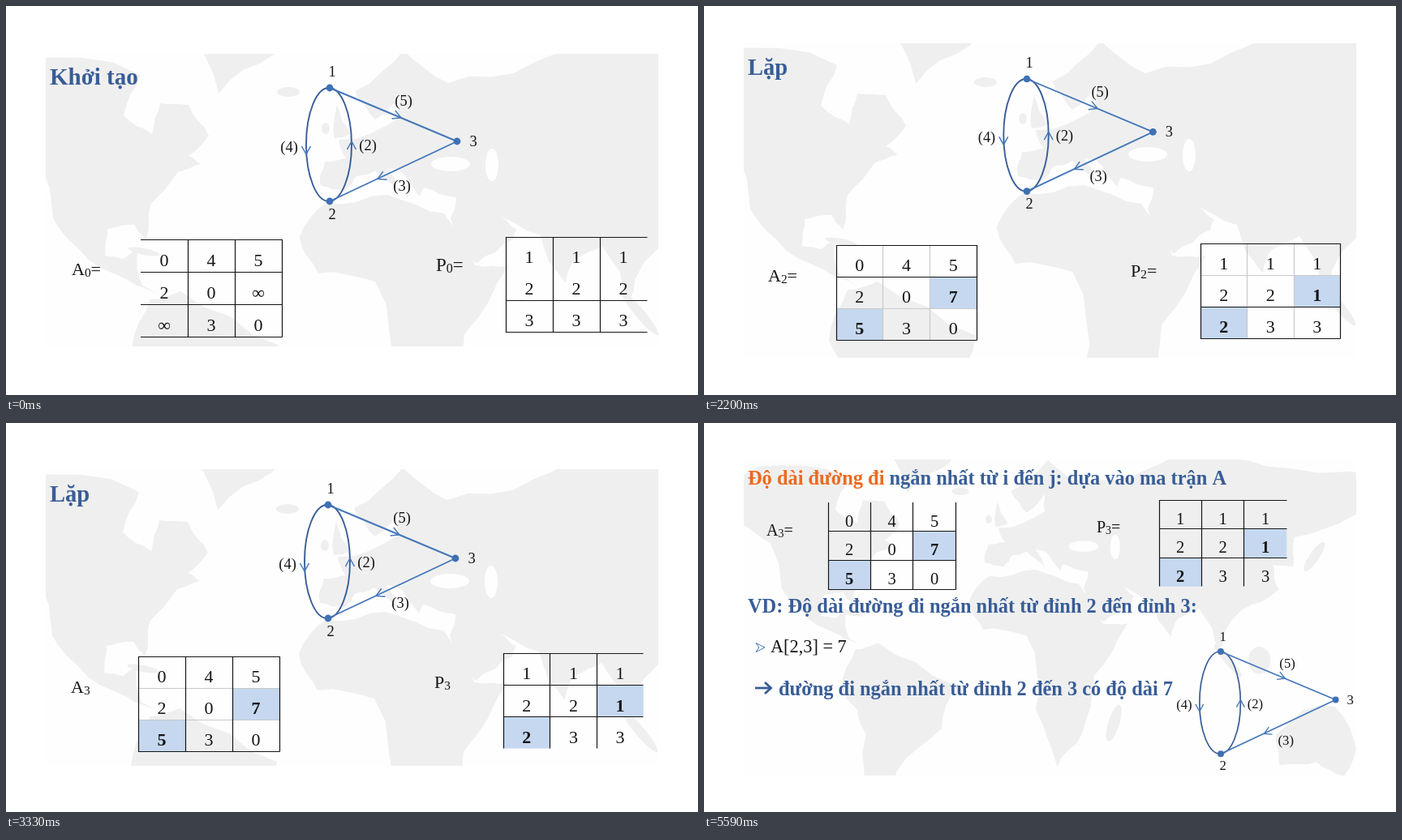
Animation, 853 px wide and 480 px high, one loop 6720 ms. Source, as an HTML page with a canvas:

```html
<!DOCTYPE html>
<html lang="vi">
<head>
<meta charset="utf-8">
<title>Đường đi ngắn nhất</title>
<style>
html, body { margin: 0; width: 100%; height: 100%; overflow: hidden; background: #fff; }
canvas { display: block; }
</style>
</head>
<body>
<canvas id="stage" width="853" height="480"></canvas>
<script>
const ctx = document.getElementById('stage').getContext('2d');
const SERIF = '"Liberation Serif", serif';
const BLUE = '#385d97', EDGE = '#4577b9', ORANGE = '#ec6a1e', INK = '#151515';
const PAPER = '#fefefe', LAND = '#efefef', MARK = '#c5d8f0', PALE = '#c9c9c9';

let seed = 7;
const random = () => (seed = (seed * 16807) % 2147483647) / 2147483647;

// Splits every side of the outline and pushes its middle sideways
function roughen(points) {
  return points.flatMap(([x, y], i) => {
    const [nx, ny] = points[(i + 1) % points.length];
    const push = (random() - 0.5) * 0.18;
    return [[x, y], [(x + nx) / 2 + (ny - y) * push, (y + ny) / 2 - (nx - x) * push]];
  });
}

function coast(corners) {
  const points = corners.split(' ').map(pair => pair.split(',').map(Number));
  return new Path2D('M' + roughen(roughen(points)).join(' ') + 'Z');
}

function blob(x, y, rx, ry, turn = 0) {
  const path = new Path2D();
  path.ellipse(x, y, rx, ry, turn, 0, 2 * Math.PI);
  return path;
}

const northAmerica = coast('-60,100 20,65 165,85 145,135 180,158 190,120 225,122 250,160 225,185 240,195 212,205 178,245 172,288 158,270 125,275 122,308 145,312 162,300 168,345 190,358 150,338 90,300 58,262 40,190 -30,140');
const southAmerica = coast('178,362 215,352 335,418 318,490 245,560 228,630 205,620 195,500 155,425');
const eurasia = coast('393,192 388,222 418,228 432,210 455,203 487,232 470,200 485,203 510,235 515,224 555,236 548,262 580,318 625,288 630,276 600,256 658,282 690,342 702,312 735,296 768,365 775,338 805,298 865,265 855,225 888,228 890,180 985,145 1075,100 880,68 750,40 650,70 545,95 490,55 430,105 455,140 490,98 485,138 410,165 420,188');
const africa = coast('395,243 470,233 540,256 578,320 620,320 565,405 545,500 505,552 470,460 455,340 385,330 362,285');
const australia = coast('860,500 905,460 955,455 990,525 970,568 925,545 865,550');
const greenland = coast('225,20 345,25 330,60 262,108');
const britain = coast('408,122 425,158 405,163');
const islands = [
  blob(170, 303, 20, 4, 0.2), blob(348, 106, 14, 6), blob(394, 151, 5, 7),
  blob(597, 482, 9, 31, 0.3), blob(782, 380, 6, 34, -0.7), blob(833, 380, 18, 22), blob(922, 212, 8, 28, 0.6)
];
const lands = [northAmerica, southAmerica, eurasia, africa, australia, greenland, britain, ...islands];
const seas = [blob(548, 195, 24, 9), blob(599, 196, 8, 20)];

function panel(top, bottom, dx, dy, scale = 1) {
  ctx.save();
  ctx.beginPath();
  ctx.rect(49, top, 755, bottom - top);
  ctx.clip();
  ctx.fillStyle = PAPER;
  ctx.fillRect(49, top, 755, bottom - top);
  ctx.translate(dx, dy);
  ctx.scale(scale, scale);
  ctx.fillStyle = LAND;
  lands.forEach(shape => ctx.fill(shape));
  ctx.fillStyle = PAPER;
  seas.forEach(shape => ctx.fill(shape));
  ctx.restore();
}

// y is the middle of the capitals; returns where the text ends
function text(str, x, y, size, { color = INK, bold = false, align = 'left' } = {}) {
  ctx.font = `${bold ? 'bold ' : ''}${size}px ${SERIF}`;
  ctx.fillStyle = color;
  ctx.textAlign = align;
  ctx.fillText(str, x, y + size * 0.33);
  return x + ctx.measureText(str).width;
}

const heading = (str, x, y, size, color = BLUE) => text(str, x, y, size, { color, bold: true });

function label(name, sub, tail, x, y, size) {
  const mid = text(name, x, y, size);
  const end = text(sub, mid, y + size * 0.2, size * 0.7);
  text(tail, end, y, size);
}

function line(x1, y1, x2, y2) {
  ctx.beginPath();
  ctx.moveTo(x1, y1);
  ctx.lineTo(x2, y2);
  ctx.stroke();
}

// Cells: '*' is bold, '#' bold on blue. Rules: k black, g pale, - none
function table(x, y, dx, dy, rows, across, down, size = 22) {
  rows.forEach((row, r) => row.split(' ').forEach((cell, c) => {
    if (cell.includes('#')) {
      ctx.fillStyle = MARK;
      ctx.fillRect(x + c * dx, y + r * dy, dx, dy);
    }
    text(cell[0], x + (c + 0.5) * dx, y + (r + 0.64) * dy, size,
      { align: 'center', bold: cell.length > 1 });
  }));
  const snap = v => Math.floor(v) + 0.5;
  const right = snap(x + 3 * dx), bottom = snap(y + 3 * dy);
  ctx.lineWidth = 1.2;
  for (const [code, color] of [['g', PALE], ['k', INK]]) {
    ctx.strokeStyle = color;
    for (let i = 0; i < 4; i++) {
      const lx = snap(x + i * dx), ly = snap(y + i * dy);
      if (across[i] === code) line(x, ly, right, ly);
      if (down[i] === code) line(lx, y, lx, bottom);
    }
  }
}

function chevron(x, y, angle) {
  ctx.save();
  ctx.translate(x, y);
  ctx.rotate(angle);
  ctx.beginPath();
  ctx.moveTo(-9, -5.5);
  ctx.lineTo(1, 0);
  ctx.lineTo(-9, 5.5);
  ctx.stroke();
  ctx.restore();
}

// Placed by its first node
function graph(x, y, scale) {
  ctx.save();
  ctx.translate(x, y);
  ctx.scale(scale, scale);
  ctx.lineWidth = 1.9;
  ctx.strokeStyle = BLUE;
  ctx.stroke(blob(-1, 70, 28, 70));
  ctx.strokeStyle = EDGE;
  line(0, 0, 157, 66);
  line(157, 66, 0, 140);
  ctx.lineWidth = 1.5;
  chevron(-29, 81, Math.PI / 2);
  chevron(27, 67, -Math.PI / 2);
  chevron(87, 36.5, Math.atan2(66, 157));
  chevron(60, 112, Math.atan2(74, -157));
  ctx.fillStyle = '#3f70b3';
  ctx.fill(blob(0, 0, 4.4, 4.4));
  ctx.fill(blob(0, 140, 4.4, 4.4));
  ctx.fill(blob(157, 66, 4.4, 4.4));
  const tag = (str, tx, ty) => text(str, tx, ty, 18.5, { align: 'center' });
  tag('1', 3, -20);
  tag('2', 3, 156);
  tag('3', 177, 66);
  tag('(5)', 91, 16);
  tag('(4)', -50, 73);
  tag('(2)', 47, 71);
  tag('(3)', 89, 121);
  ctx.restore();
}

function bullet(x, y, w, solid) {
  const h = w * 0.5;
  ctx.beginPath();
  ctx.moveTo(x, y - h);
  ctx.lineTo(x + w, y);
  ctx.lineTo(x, y + h);
  ctx.lineTo(x + w * 0.35, y);
  ctx.closePath();
  ctx.fillStyle = ctx.strokeStyle = solid ? '#2f62a5' : EDGE;
  ctx.lineWidth = 1;
  if (solid) ctx.fill(); else ctx.stroke();
}

function arrow(x, y, w) {
  ctx.strokeStyle = BLUE;
  ctx.lineWidth = 2.8;
  line(x, y, x + w - 1, y);
  ctx.beginPath();
  ctx.moveTo(x + w - 9, y - 7);
  ctx.lineTo(x + w - 1.5, y);
  ctx.lineTo(x + w - 9, y + 7);
  ctx.stroke();
}

const finalA = ['0 4 5', '2 0 7#', '5# 3 0'];
const finalP = ['1 1 1', '2 2 1#', '2# 3 3'];

const scenes = [
  () => {
    panel(59, 420, 0, 0);
    heading('Khởi tạo', 54, 87.5, 29);
    graph(399, 101, 1);
    label('A', '0', '=', 81, 325, 22);
    table(166, 288, 58, 40, ['0 4 5', '2 0 ∞', '∞ 3 0'], 'kkkk', '-kkk');
    label('P', '0', '=', 530, 319, 23);
    table(616, 285, 58, 39, ['1 1 1', '2 2 2', '3 3 3'], 'k-kk', 'kkk-');
  },
  () => {
    panel(54, 426, 0, -4);
    heading('Lặp', 60, 85, 28.5);
    ctx.fillRect(49, 84, 2.5, 2.5);
    graph(401, 98, 0.985);
    label('A', '1', '=', 84, 328, 22);
    table(168, 291, 57.3, 39.4, ['0 4* 5', '2 0 7#', '∞ 3 0'], 'kggk', 'kggk');
    label('P', '1', '=', 529, 321, 22);
    table(613, 289, 57.3, 38.5, ['1 1 1', '2 2 1#', '3 3 3'], 'kkkk', 'kggk');
  },
  () => {
    panel(46, 434, -1, -12);
    heading('Lặp', 54, 76, 28.5);
    graph(398, 90, 0.99);
    label('A', '2', '=', 79, 333, 22);
    table(163, 295, 57.7, 39.1, finalA, 'kkgk', 'kggk');
    label('P', '2', '=', 526, 327, 22);
    table(612, 293, 57.5, 39, finalP, 'kgkk', 'kggk');
  },
  () => {
    panel(57, 423, -1, 0);
    heading('Lặp', 54, 88, 28.5);
    graph(397, 101, 1);
    label('A', '3', '', 80, 326, 22);
    table(163, 288, 58, 39, finalA, 'kggk', 'kkkk');
    label('P', '3', '', 528, 320, 22);
    table(613, 284, 57.6, 39.2, finalP, 'kkk-', 'kkk-');
  },
  () => {
    panel(54, 427, 76, 12, 0.73);
    bullet(56, 73, 14, true);
    const end = heading('Đường đi ', 78, 73, 23.5, ORANGE);
    heading('ngắn nhất từ i đến j: dòng thứ i của ma trận P', end, 73, 23.5);
    label('A', '3', '=', 100, 135, 20);
    table(173, 102, 51, 34.2, finalA, '-kkk', 'kkkk', 20);
    label('P', '3', '=', 491, 130, 20);
    table(566, 100, 50.5, 34, finalP, 'kkk-', 'kkk-', 20);
    bullet(56, 225, 14, true);
    heading('VD: Đường đi ngắn nhất từ đỉnh 2 đến đỉnh 3:', 78, 225, 23.5);
    bullet(87, 272, 10);
    text('P[2,3] = 1 → 2 là đỉnh trước của đỉnh 3', 104, 273, 20.1);
    bullet(87, 317, 10);
    text('P[2,1] = 2  → đỉnh 2 là đỉnh trước của 1', 104, 318, 20.1);
    arrow(88, 366, 19);
    heading('đường đi là: 2 → 1 → 3', 115, 366, 23.5);
    graph(639, 280, 0.866);
  },
  () => {
    panel(45, 435, 51.5, 4, 0.76);
    const end = heading('Độ dài đường đi ', 54, 68, 24.4, ORANGE);
    heading('ngắn nhất từ i đến j: dựa vào ma trận A', end, 68, 24.4);
    label('A', '3', '=', 77, 132, 20);
    table(153, 98, 52.4, 35.8, finalA, '-kkk', 'kkkk', 20.5);
    label('P', '3', '=', 484, 128, 20);
    table(561, 95, 52.4, 35.6, finalP, 'kkk-', 'kkk-', 20.5);
    heading('VD: Độ dài đường đi ngắn nhất từ đỉnh 2 đến đỉnh 3:', 54, 226, 24.4);
    bullet(64, 277, 11);
    text('A[2,3] = 7', 82, 276, 22.3);
    arrow(63, 327, 21);
    heading('đường đi ngắn nhất từ đỉnh 2 đến 3 có độ dài 7', 92, 328, 24.4);
    graph(637, 282, 0.902);
  }
];

const FIRST = 1070, HOLD = 1130, LOOP = 6720;
const start = performance.now();
let shown = -1;

function tick() {
  const t = (performance.now() - start) % LOOP;
  const index = t < FIRST ? 0 : 1 + Math.floor((t - FIRST) / HOLD);
  if (index !== shown) {
    shown = index;
    ctx.fillStyle = '#fff';
    ctx.fillRect(0, 0, 853, 480);
    scenes[index]();
  }
  requestAnimationFrame(tick);
}
tick();
</script>
</body>
</html>
```
